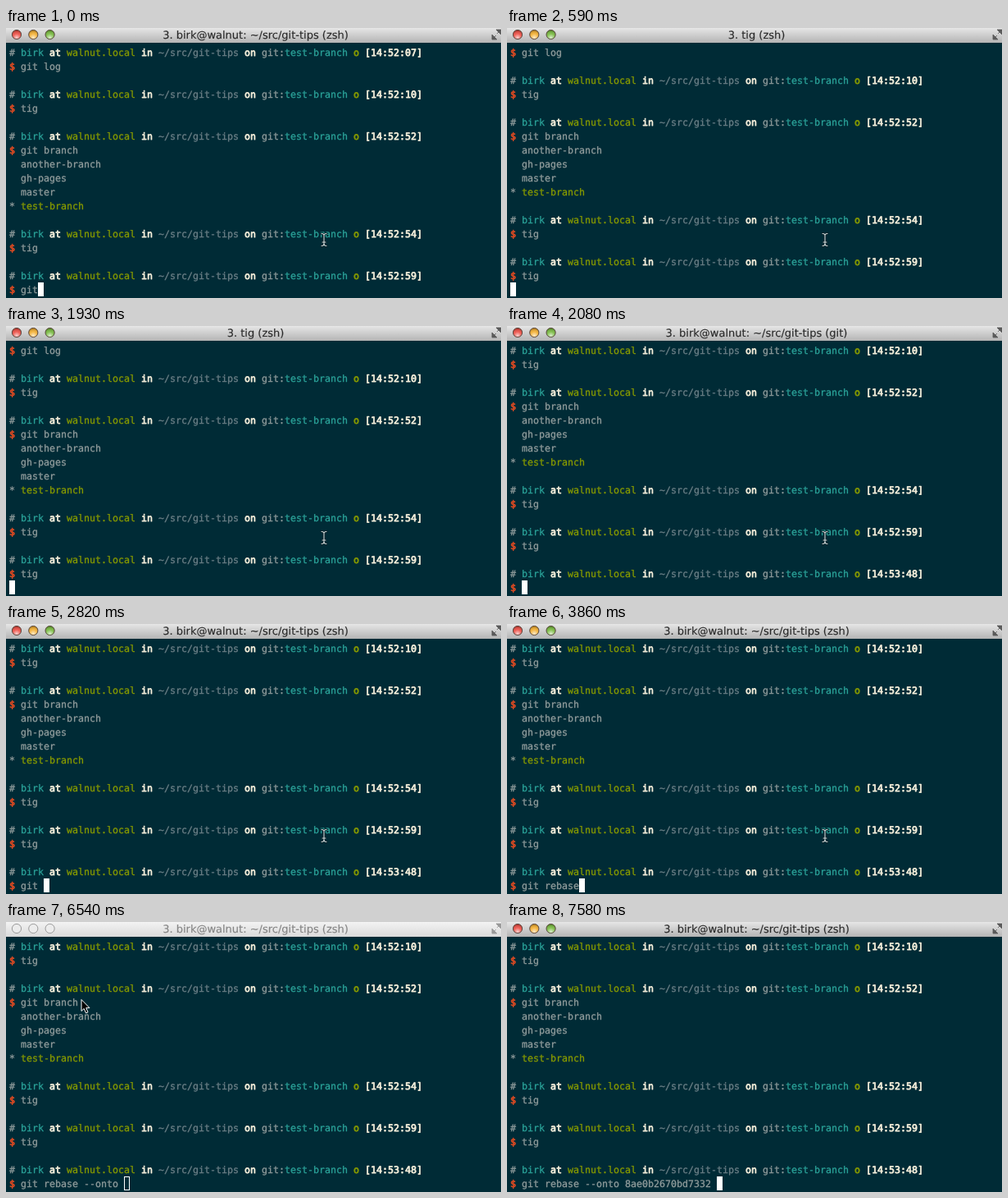
Animation of 604 by 329 pixels, one loop 8 s. Source, as an HTML page:

```html
<!DOCTYPE html>
<html lang="en">
<head>
<meta charset="utf-8">
<title>Terminal session</title>
<style>
  html, body { margin: 0; width: 100%; height: 100%; overflow: hidden; background: #002b36; }
  svg { display: block; width: 604px; height: 329px; }
  text { white-space: pre; text-rendering: geometricPrecision; stroke-linejoin: round; }
  .term text { font: 11.63px "DejaVu Sans Mono", monospace; stroke-width: .3px; }
  .term text.b { stroke-width: .75px; }
  .title { font: 13px "DejaVu Sans", sans-serif; text-anchor: middle; stroke-width: .15px; }
</style>
</head>
<body>
<svg id="stage" viewBox="0 0 604 329">
  <defs>
    <linearGradient id="barOn" x2="0" y2="1"><stop stop-color="#e6e6e6"/><stop offset="1" stop-color="#b4b4b4"/></linearGradient>
    <linearGradient id="barOff" x2="0" y2="1"><stop stop-color="#f3f3f3"/><stop offset="1" stop-color="#dadada"/></linearGradient>
    <radialGradient id="gloss" cy=".85" r=".75"><stop stop-color="#fff" stop-opacity=".75"/><stop offset=".6" stop-color="#fff" stop-opacity=".1"/><stop offset="1" stop-color="#000" stop-opacity=".25"/></radialGradient>
  </defs>
  <rect width="604" height="329" fill="#002b36"/>
  <g class="term" id="term"></g>
  <rect id="cursor" height="17"/>
  <g id="bar"></g>
  <g id="beam" fill="none" stroke-linecap="round">
    <path d="M-3-7.5Q0-7.5 0-5V5Q0 7.5-3 7.5M3-7.5Q0-7.5 0-5V5Q0 7.5 3 7.5M-2 3H2" stroke="#001c24" stroke-width="2.6"/>
    <path d="M-3-7.5Q0-7.5 0-5V5Q0 7.5-3 7.5M3-7.5Q0-7.5 0-5V5Q0 7.5 3 7.5M-2 3H2" stroke="#d5dcdc" stroke-width="1.1"/>
  </g>
  <path id="arrow" d="M0 0V14L3.2 11L5.6 16.5L8 15.4L5.7 10.2H10Z" fill="#000" stroke="#fff"/>
</svg>
<script>
const LOOP = 8000, COL = 7, ROW = 17, LEFT = 4, TOP = 21, ROWS = 18;
const C = {
  gray: '#8f9b9b', path: '#6b7f86', cyan: '#2aa198', olive: '#859900', red: '#dc4a22',
  cream: '#f7f0dc', blue: '#268bd2', white: '#ffffff'
};
const $ = id => document.getElementById(id);

// A run is [column, text, colour, bold].
const prompt = time => [
  [0, '#', C.gray], [2, 'birk', C.cyan], [7, 'at', C.cream, 1], [10, 'walnut.local', C.olive],
  [23, 'in', C.cream, 1], [26, '~/src/git-tips', C.path], [41, 'on', C.cream, 1],
  [44, 'git:', C.gray], [48, 'test-branch', C.cyan], [60, 'o', C.olive, 1],
  [62, `[${time}]`, C.cream, 1]
];
const command = text => [[0, '$', C.red, 1], [2, text, C.gray]];
const output = text => [[2, text, C.gray]];

const history = [
  prompt('14:52:07'), command('git log'), [],
  prompt('14:52:10'), command('tig'), [],
  prompt('14:52:52'), command('git branch'),
  output('another-branch'), output('gh-pages'), output('master'),
  [[0, '*', C.gray], [2, 'test-branch', C.olive]], [],
  prompt('14:52:54'), command('tig'), [],
  prompt('14:52:59')
];

const commit = (date, author, mark, message) => [
  [0, date, C.blue], [17, author, C.olive], [36, mark, C.blue], [38, message, C.gray]
];
const bright = runs => runs.map(([col, text]) => [col, text, C.white, 1]);
const logView = [
  bright(commit('2014-04-10 14:16', 'Nora Birk', 'o', '[test-branch] [gh-pages] [master] [origin/HEAD]')),
  commit('2014-04-10 14:01', 'Nora Birk', 'o', 'Adding link to readme'),
  commit('2014-04-10 13:58', 'Nora Birk', 'o', 'Adding files'),
  commit('2014-04-10 05:32', 'norabirk', 'I', 'Initial commit')
];
logView[16] = [[0, '[main] 695f840fd577b464272ede169136dfef8da584d3 - commit 1 of 4 (100%)', C.white, 1]];

const shellTitle = job => `3. birk@walnut: ~/src/git-tips (${job})`;
const tigTitle = '3. tig (zsh)';

// Each step overrides part of the state from its time on.
const steps = [
  [0, { title: shellTitle('zsh'), view: 'first', typed: 'git', focus: true, beam: [388, 258], arrow: null }],
  [150, { typed: '' }],
  [300, { typed: 't' }],
  [430, { typed: 'tig' }],
  [580, { view: 'running', title: tigTitle }],
  [730, { view: 'log' }],
  [1930, { view: 'running' }],
  [2080, { view: 'second', typed: '', title: shellTitle('git') }],
  [2520, { typed: 'g', title: shellTitle('zsh') }],
  [2670, { typed: 'git' }],
  [2820, { typed: 'git ' }],
  [2970, { typed: 'git r' }],
  [3120, { typed: 'git reb' }],
  [3420, { typed: 'git reba' }],
  [3570, { typed: 'git rebas' }],
  [3720, { typed: 'git rebase' }],
  [3870, { typed: 'git rebase ' }],
  [4010, { typed: 'git rebase --' }],
  [4160, { typed: 'git rebase --o' }],
  [4300, { typed: 'git rebase --ont' }],
  [4450, { typed: 'git rebase --onto ' }],
  [4900, { beam: [313, 214] }],
  [5050, { beam: null }],
  [5500, { focus: false }],
  [6540, { arrow: [92, 94.5] }],
  [6690, { focus: true, arrow: null, beam: [158, 99] }],
  [6990, { beam: [172, 108] }],
  [7140, { beam: null }],
  [7290, { typed: 'git rebase --onto 8ae0b2670bd7332' }],
  [7580, { typed: 'git rebase --onto 8ae0b2670bd7332 ' }]
];

const rect = (x, y, w, h, fill) => `<rect x="${x}" y="${y}" width="${w}" height="${h}" fill="${fill}"/>`;
const ink = color => `fill="${color}" stroke="${color}"`;

function drawRows(rows) {
  return rows.map((runs, i) => runs.map(([col, text, color, bold]) =>
    `<text x="${LEFT + col * COL}" y="${TOP + 13 + i * ROW}" ${ink(color)}${bold ? ' class="b"' : ''}>${text}</text>`
  ).join('')).join('');
}

function drawBar({ title, focus }) {
  const lights = ['#ec4a40', '#f3ad2c', '#74b83a'].map((color, i) => {
    const circle = `<circle cx="${13 + i * 20.3}" cy="8" r="5.6"`;
    return focus
      ? `${circle} fill="${color}"/>${circle} fill="url(#gloss)" stroke="#5c4a42"/>`
      : `${circle} fill="#ececec" stroke="#9b9b9b"/>`;
  }).join('');
  return rect(0, 0, 604, 18, `url(#${focus ? 'barOn' : 'barOff'})`) + lights +
    `<text class="title" x="304.5" y="13" ${ink(focus ? '#2a2a2a' : '#858585')}>${title}</text>` +
    `<path d="M598 2H604V8ZM593 8V14H599ZM599 7L602 4M595 12L598 9" ${ink(focus ? '#5a5a5a' : '#999')} stroke-width=".8"/>`;
}

function screen({ view, typed }) {
  if (view === 'log') return { rows: logView, col: 85, row: 0 };
  const lines = [...history, command(view === 'second' ? 'tig' : typed)];
  let col = 2 + typed.length;
  if (view === 'running') { lines.push([]); col = 0; }
  if (view === 'second') lines.push([], prompt('14:53:48'), command(typed));
  return { rows: lines.slice(-ROWS), col, row: ROWS - 1 };
}

function place(el, point) {
  el.style.display = point ? '' : 'none';
  if (point) el.setAttribute('transform', `translate(${point})`);
}

function render(state) {
  const { rows, col, row } = screen(state);
  const bands = state.view === 'log'
    ? rect(LEFT, TOP, 600, ROW, C.olive) + rect(LEFT, TOP + 16 * ROW, 600, ROW, C.blue) : '';
  $('term').innerHTML = bands + drawRows(rows);
  $('bar').innerHTML = drawBar(state);

  const inset = state.focus ? 0 : 0.5;
  const box = {
    x: LEFT + col * COL + inset, y: TOP + row * ROW + inset,
    width: COL - 2 * inset, height: ROW - 2 * inset,
    fill: state.focus ? C.white : 'none', stroke: state.focus ? 'none' : C.white
  };
  for (const key in box) $('cursor').setAttribute(key, box[key]);
  place($('beam'), state.beam);
  place($('arrow'), state.arrow);
}

let shown = -1;
function tick(now) {
  const time = now % LOOP;
  const count = steps.filter(([at]) => at <= time).length;
  if (count !== shown) {
    shown = count;
    render(Object.assign({}, ...steps.slice(0, count).map(step => step[1])));
  }
  requestAnimationFrame(() => tick(performance.now() - start));
}
const start = performance.now();
tick(0);
</script>
</body>
</html>
```
